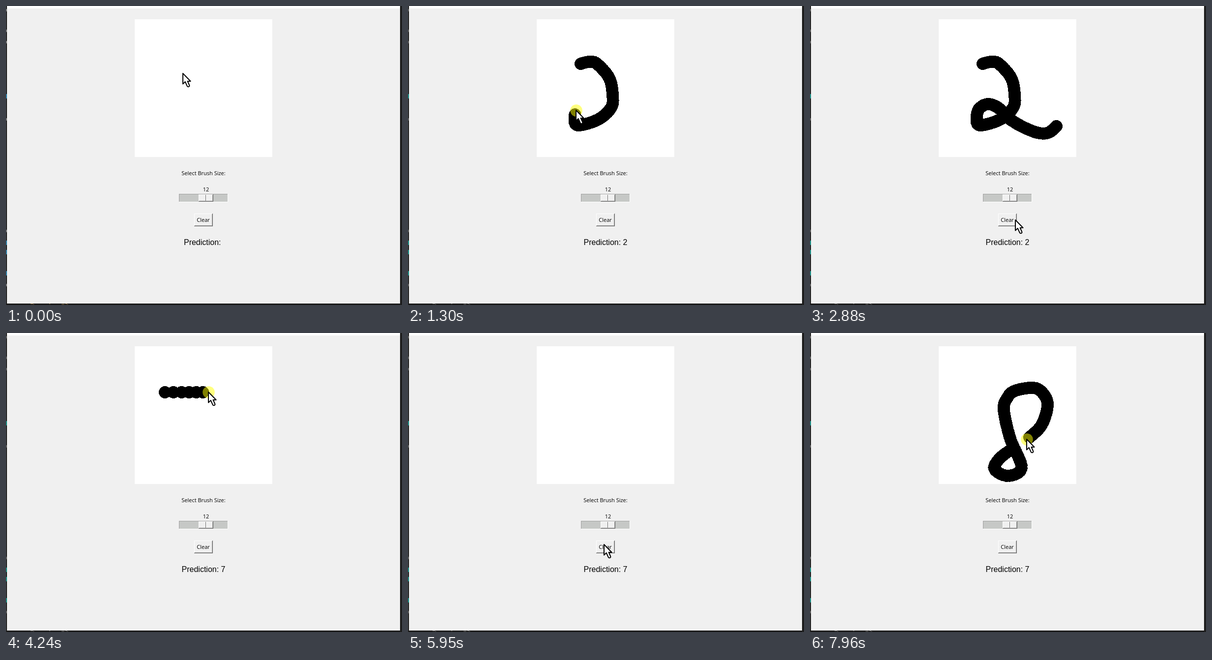
Write an HTML page that moves like this. It is 806x608 px and loops after 8000 ms.

```html
<!DOCTYPE html>
<html lang="en">
<head>
<meta charset="utf-8">
<title>Digit recognizer</title>
<style>
  html, body { margin: 0; width: 100%; height: 100%; overflow: hidden; background: #1e1e1e; }
  svg { display: block; width: 806px; height: 608px; }
  rect, #ink, .bevel { shape-rendering: crispEdges; }
  text { text-anchor: middle; white-space: pre; fill: #000; }
  .ui { font: 11px "Open Sans", "Noto Sans", sans-serif; }
  #prediction { font: 16px "Liberation Sans", Arial, sans-serif; }
  #ink { fill: none; stroke: #000; stroke-width: 25; stroke-linecap: round; }
  .bevel { fill: none; }
</style>
</head>
<body>
<svg viewBox="0 0 806 608">
  <rect width="806" height="608" fill="#1e1e1e"/>
  <g id="editor"></g>
  <rect x="2" width="800" height="5" fill="#fff"/>
  <rect x="2" y="5" width="800" height="600" fill="#f0f0f0"/>
  <rect x="262" y="27" width="280" height="280" fill="#fff"/>
  <path id="ink" transform="translate(.5 .5)"/>

  <text class="ui" x="402" y="344">Select Brush Size:</text>
  <text class="ui" x="407" y="377">12</text>
  <rect x="352" y="382" width="100" height="17" fill="#c6c8c6"/>
  <path class="bevel" stroke="#a0a0a0" d="M352.5 398V382.5H451"/>
  <path class="bevel" stroke="#fff" d="M352 398.5H451.5V382"/>
  <rect x="392" y="383" width="30" height="15" fill="#f0f0f0"/>
  <path class="bevel" stroke="#fff" d="M392.5 397V383.5H421M407.5 384V397"/>
  <path class="bevel" stroke="#696969" d="M392 397.5H421.5V383M406.5 384V397"/>
  <path class="bevel" stroke="#a0a0a0" d="M393 396.5H420.5V384"/>

  <path id="lit" class="bevel" d="M383.5 447V422.5H420"/>
  <path id="shade" class="bevel" d="M383 447.5H420.5V422"/>
  <path id="inner" class="bevel" stroke="#a0a0a0" d="M384 446.5H419.5V423"/>
  <text id="clear" class="ui" x="401.5" y="439">Clear</text>
  <text id="prediction" x="402" y="486"></text>

  <g id="pointer">
    <circle id="halo" cx=".5" cy=".5" r="12.3" fill="#ff0" fill-opacity=".5"/>
    <path fill="#fff" stroke="#000" stroke-width="2" stroke-linejoin="round"
      d="M0 0V21.5L4.7 17L9 26.3Q10.5 28 12.5 26.8Q14 25.6 13.2 24L9.6 16H15.6Z"/>
  </g>
</svg>
<script>
const LOOP = 8000, TICK = 68.5, LEAD = 15;
const LAG = 25;                 // the ink trails the pointer a little
const CLEARS = [3400, 5940], PRESS = 190;
const SVG = "http://www.w3.org/2000/svg";

const $ = id => document.getElementById(id);
const set = (el, attrs) => { for (const k in attrs) el.setAttribute(k, attrs[k]); };
const make = (tag, attrs) => {
  const el = document.createElementNS(SVG, tag);
  set(el, attrs);
  return el;
};

// Smooth path through a few points "x,y x,y ..." (Catmull-Rom as Bezier segments).
function spline(text) {
  const pts = text.split(" ").map(p => p.split(",").map(Number));
  const at = i => pts[Math.max(0, Math.min(pts.length - 1, i))];
  const handle = (i, side) => at(i).map((v, n) => v + side * (at(i + 1)[n] - at(i - 1)[n]) / 6);
  let d = "M" + pts[0];
  for (let i = 0; i < pts.length - 1; i++)
    d += `C${handle(i, 1)} ${handle(i + 1, -1)} ${at(i + 1)}`;
  return make("path", { d });
}

// settle > 0 slows towards the end, < 0 starts slowly; gap is ms between dabs of ink.
function gesture(from, to, points, settle, gap = 0, guesses = "") {
  const path = spline(points);
  return { from, to, path, length: path.getTotalLength(), settle, gap, guesses };
}
const gestures = [
  gesture(0, 50, "360,137", 0),
  gesture(50, 185, "360,137 351,117", 0),
  gesture(185, 2160, "351,117 368,113 384,117 409,146 416,180 413,206 387,230 345,242 " +
    "339,225 345,207 363,199 383,207 403,227 430,244 462,257 485,257 503,242", 0, 18, "72"),
  gesture(2170, 2370, "503,242", 0),
  gesture(2370, 3080, "503,242 453,396 421,433 399,435", 1),
  gesture(3510, 3980, "399,435 323,120", 0),
  gesture(3980, 4384, "323,120 444,120", .33, 45, "7"),
  gesture(4560, 5140, "444,120 437,180 415,240 381,292", 0, 18),
  gesture(5220, 5780, "381,292 399,435", 1),
  gesture(5900, 6290, "399,435 404,240", -1),
  gesture(6290, 7946, "404,240 385,255 375,276 402,290 430,273 407,214 394,155 " +
    "402,130 417,117 455,111 475,124 483,148 470,188 441,216", .33, 18, "001117")
];

function progress(g, t) {
  const u = Math.min(1, (t - g.from) / (g.to - g.from));
  return u + g.settle * u * (1 - u);
}
const pointOn = (g, t) => g.path.getPointAtLength(g.length * progress(g, t));

function inkAt(t) {
  const wiped = Math.max(0, ...CLEARS.filter(c => c <= t));
  let d = "";
  for (const g of gestures) {
    if (!g.gap || g.from < wiped) continue;
    for (let s = g.from; s <= Math.min(t - LAG, g.to); s += g.gap) {
      const { x, y } = pointOn(g, s);
      d += `M${x.toFixed(1)} ${y.toFixed(1)}h.01`;
    }
  }
  return d;
}

function guessAt(t) {
  const g = gestures.filter(g => g.guesses && g.from <= t).pop();
  if (!g) return "";
  const n = g.guesses.length;
  return g.guesses[Math.min(n - 1, Math.floor(progress(g, t) * n))];
}

// Bits of the editor showing around the window.
const rows = (ys, height) => ys.map(y => make("rect", { y: y - height / 2, width: 2, height }));
const keywords = rows([183, 481, 500, 543], 9);
const symbols = rows([8, 50, 73, 230, 457, 567], 5);
const under = make("path", { fill: "none", d: "M50 605.5h5l2 2M88 605.5h2M114.5 605v3M117.5 605v3M121 605.5h3l2 2" });
$("editor").append(...keywords, ...symbols, under);

function draw(t) {
  const g = gestures.filter(g => g.from <= t).pop();
  const { x, y } = pointOn(g, t);
  const pressed = CLEARS.some(c => t >= c - PRESS && t < c);
  const later = t > 350;

  set($("pointer"), { transform: `translate(${Math.round(x)} ${Math.round(y)})` });
  set($("halo"), { visibility: pressed || g.gap ? "visible" : "hidden" });
  set($("ink"), { d: inkAt(t) });

  set($("lit"), { stroke: pressed ? "#696969" : "#fff" });
  set($("shade"), { stroke: pressed ? "#fff" : "#696969" });
  set($("inner"), { visibility: pressed ? "hidden" : "visible" });
  set($("clear"), { x: pressed ? 402.5 : 401.5, y: pressed ? 440 : 439 });
  $("prediction").textContent = "Prediction: " + guessAt(t);

  for (const el of keywords) set(el, { fill: later ? "#148a80" : "#2a7fa8" });
  for (const el of symbols) set(el, { fill: later ? "#555" : "#777" });
  set(under, { stroke: later ? "#777" : "#9a7b4a" });
}

const start = performance.now();
let shown = -1;
function loop() {
  const t = (performance.now() - start) % LOOP;
  const step = Math.floor((t + LEAD) / TICK);
  if (step !== shown) draw((shown = step) * TICK);
  requestAnimationFrame(loop);
}
loop();
</script>
</body>
</html>
```
